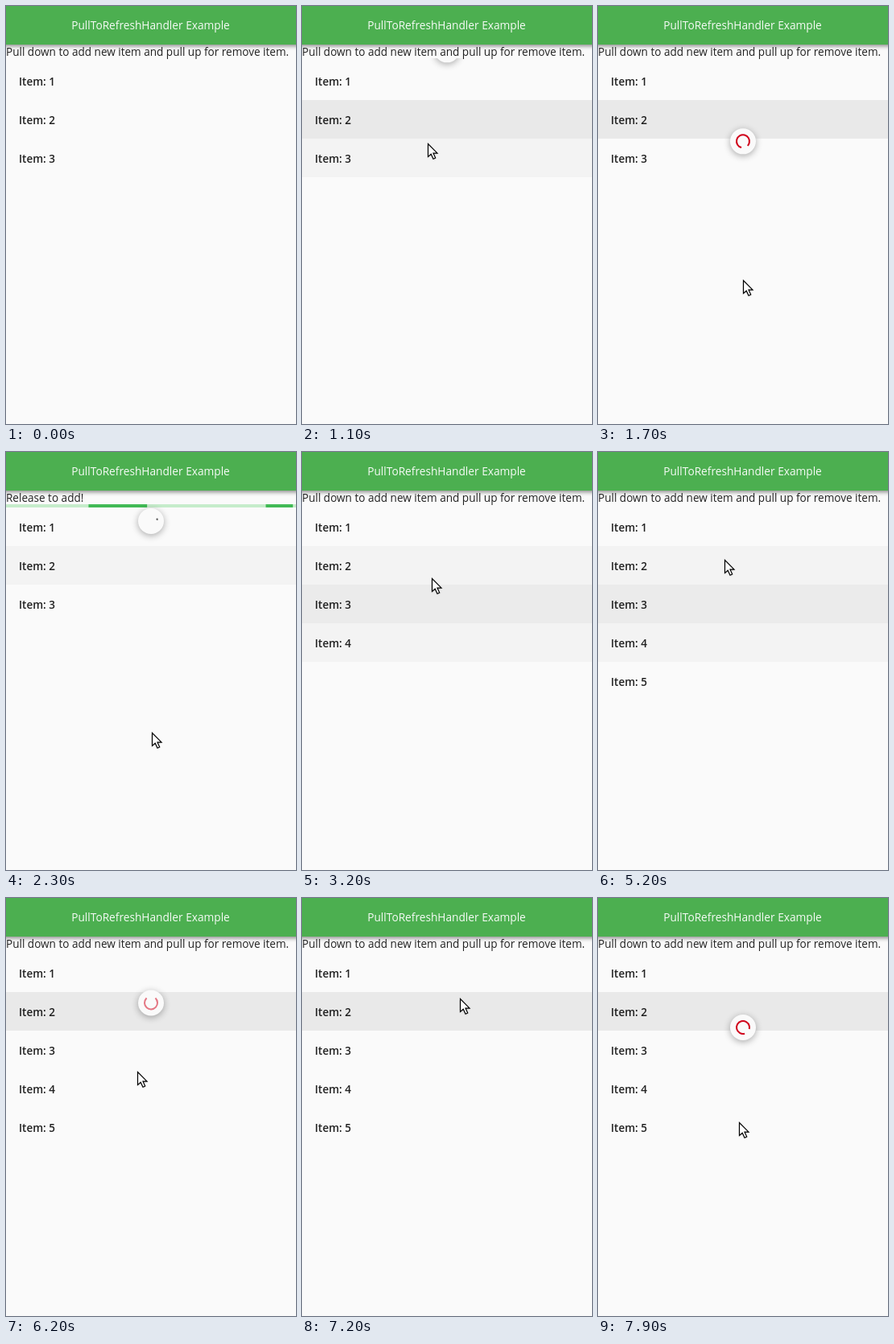
Recreate the animation shown at these times as an HTML page with a canvas. Size 360 by 520 pixels, loop 8 s.

```html
<!DOCTYPE html>
<html lang="en">
<head>
<meta charset="utf-8">
<title>Pull to refresh</title>
<style>
html, body { margin: 0; width: 100%; height: 100%; overflow: hidden; background: #fafafa; }
canvas { display: block; width: 360px; height: 520px; }
</style>
</head>
<body>
<canvas id="stage"></canvas>
<script>
const W = 360, H = 520, LOOP = 8000, STEP = 100;
const ROW_TOP = 69, ROW_H = 48, BAR_Y = 65, REST_Y = 86, SLOP = 7;
const FONT = '"Open Sans", "Noto Sans", sans-serif';
const INK = 'rgba(0,0,0,0.87)', RED = '#d0021b';

const canvas = document.getElementById('stage');
const ctx = canvas.getContext('2d');
const scale = window.devicePixelRatio || 1;
canvas.width = W * scale;
canvas.height = H * scale;

const clamp = (v, lo = 0, hi = 1) => Math.min(hi, Math.max(lo, v));
const mix = (a, b, k) => a + (b - a) * k;
const smooth = v => { const x = clamp(v); return x * x * (3 - 2 * x); };
const rad = deg => deg * Math.PI / 180;

// Places where the pointer turns or rests; it eases from one to the next
const high = 118, low = 370;
const stops = [
  { t: 200, x: 250, y: 308 },
  { t: 1000, x: 155, y: 163 },
  { t: 1800, x: 181, y: 349 },
  { t: 2400, x: 181, y: 349 },
  { t: 3480, x: 157, y: high },
  { t: 4380, x: 164, y: low },
  { t: 4700, x: 164, y: low },
  { t: 5290, x: 157, y: high },
  { t: 5800, x: 157, y: high },
  { t: 6470, x: 166, y: 271 },
  { t: 7000, x: 197, y: high },
  { t: 7100, x: 197, y: high },
  { t: 7900, x: 175, y: 279 }
];

// Each pull: press, armed (bar shown), release, item added
const pulls = [
  { press: 1000, armed: 1800, release: 2200, done: 2700 },
  { press: 3480, armed: 4400, release: 4600, done: 5000 },
  { press: 5800, armed: LOOP, release: LOOP, done: LOOP }
];

function pointer(t) {
  const i = stops.findIndex(s => s.t >= t);
  if (i === 0) return null;
  const a = stops[i - 1], b = stops[i];
  const k = smooth((t - a.t) / (b.t - a.t));
  return { x: Math.round(mix(a.x, b.x, k)), y: Math.round(mix(a.y, b.y, k)) };
}

const rowAt = y => Math.floor((y - ROW_TOP) / ROW_H);
const heldPull = t => pulls.find(p => t >= p.press && t < p.release);

// A held pointer keeps the row it was pressed on
function hoveredRow(t) {
  const held = heldPull(t);
  const at = pointer(held ? held.press : t);
  return at ? rowAt(at.y) : -1;
}

// The highlight lags behind the pointer and fades over three steps
function highlight(row, t) {
  const weights = [0.41, 0.88, 0.41];
  return clamp(weights.reduce((sum, w, i) => sum + (hoveredRow(t - i * STEP) === row ? w : 0), 0));
}

// The pull resists more the further it goes
function pulledY(t, pull) {
  const distance = pointer(t).y - pointer(pull.press).y - SLOP;
  return 49 + 82 * Math.pow(Math.max(0, distance) / 92, 0.605);
}

function text(str, x, y, size, color, weight = 450, align = 'left') {
  ctx.font = `${weight} ${size}px ${FONT}`;
  ctx.fillStyle = color;
  ctx.textAlign = align;
  ctx.fillText(str, x, y);
}

function shadow(color, blur, dy) {
  ctx.shadowColor = color;
  ctx.shadowBlur = blur * scale;
  ctx.shadowOffsetY = dy * scale;
}

function drawRows(t) {
  const count = 3 + pulls.filter(p => t >= p.done).length;
  for (let i = 0; i < count; i++) {
    const top = ROW_TOP + i * ROW_H;
    ctx.fillStyle = `rgba(0,0,0,${0.068 * highlight(i, t)})`;
    ctx.fillRect(0, top, W, ROW_H);
    text(`Item: ${i + 1}`, 16, top + 30, 13.5, INK, 600);
  }
}

function drawBar(t) {
  const p = (t + 700) % 1800;
  const segment = (tail, tailTime, head, headTime) => {
    const a = W * smooth((p - tail) / tailTime);
    const b = W * smooth((p - head) / headTime);
    ctx.fillRect(a, BAR_Y, b - a, 4);
  };
  ctx.fillStyle = '#c6eccb';
  ctx.fillRect(0, BAR_Y, W, 4);
  ctx.fillStyle = '#41ba55';
  segment(333, 1084, 0, 1278);
  segment(1000, 568, 900, 611);
}

function drawSpinner(y, start, sweep, color, alpha = 1, size = 1) {
  ctx.save();
  ctx.beginPath();
  ctx.rect(0, BAR_Y, W, H);
  ctx.clip();
  ctx.translate(180, y);
  ctx.scale(size, size);
  shadow('rgba(0,0,0,0.32)', 8, 2);
  ctx.fillStyle = '#fafafa';
  ctx.beginPath();
  ctx.arc(0, 0, 16, 0, 2 * Math.PI);
  ctx.fill();
  ctx.shadowColor = 'transparent';
  ctx.globalAlpha = alpha;
  ctx.strokeStyle = color;
  ctx.lineWidth = 2;
  ctx.beginPath();
  ctx.arc(0, 0, 8, rad(start), rad(start + sweep));
  ctx.stroke();
  ctx.restore();
}

function drawPulled(t, pull) {
  const y = pulledY(t, pull), past = y - 131;
  if (y < 50) return;
  drawSpinner(y, past * 4 - 45, clamp((y - 60) * 3.9, 0, 300), RED, clamp(0.55 + past * 0.03, 0.3));
}

function drawLoading(t, pull) {
  const age = t - pull.release;
  const spin = Math.max(0, age - STEP);
  const y = mix(pulledY(pull.release, pull), REST_Y, smooth(age / STEP));
  const size = 1 - clamp((t - pull.done) / 200);
  drawSpinner(y, spin * 0.25 - 25, 16 + 230 * smooth(spin / 500), spin ? RED : '#555', 1, size);
}

function drawHeader() {
  ctx.save();
  shadow('rgba(0,0,0,0.45)', 5, 2);
  ctx.fillStyle = '#4caf50';
  ctx.fillRect(-10, -10, W + 20, 58);
  ctx.restore();
  text('PullToRefreshHandler Example', 179.5, 29, 13.7, '#f6fbf6', 450, 'center');
}

function drawPointer({ x, y }) {
  ctx.save();
  ctx.translate(x + 0.5, y + 0.5);
  shadow('rgba(0,0,0,0.25)', 2, 1);
  ctx.fillStyle = '#fff';
  ctx.strokeStyle = '#000';
  ctx.lineWidth = 1.2;
  ctx.stroke(fillPath('M0 0V16L3.7 12.7 6.5 18.7 9.2 17.5 6.5 11.7H11.5Z'));
  ctx.restore();
}

function fillPath(d) {
  const shape = new Path2D(d);
  ctx.fill(shape);
  ctx.shadowColor = 'transparent';
  return shape;
}

function draw(t) {
  const mouse = pointer(t);
  const armed = pulls.some(p => t >= p.armed && t < p.done);
  const held = heldPull(t);
  const loading = pulls.find(p => t >= p.release && t < p.done + 200);
  ctx.setTransform(scale, 0, 0, scale, 0, 0);
  ctx.fillStyle = '#fafafa';
  ctx.fillRect(0, 0, W, H);
  drawRows(t);
  text(armed ? 'Release to add!' : 'Pull down to add new item and pull up for remove item.',
    0, 62, 13.55, INK);
  if (armed) drawBar(t);
  if (held) drawPulled(t, held);
  if (loading) drawLoading(t, loading);
  drawHeader();
  if (mouse) drawPointer(mouse);
}

const begin = performance.now();
function tick() {
  const t = (performance.now() - begin) % LOOP;
  draw(Math.floor(t / STEP) * STEP);
  requestAnimationFrame(tick);
}
tick();
</script>
</body>
</html>
```
